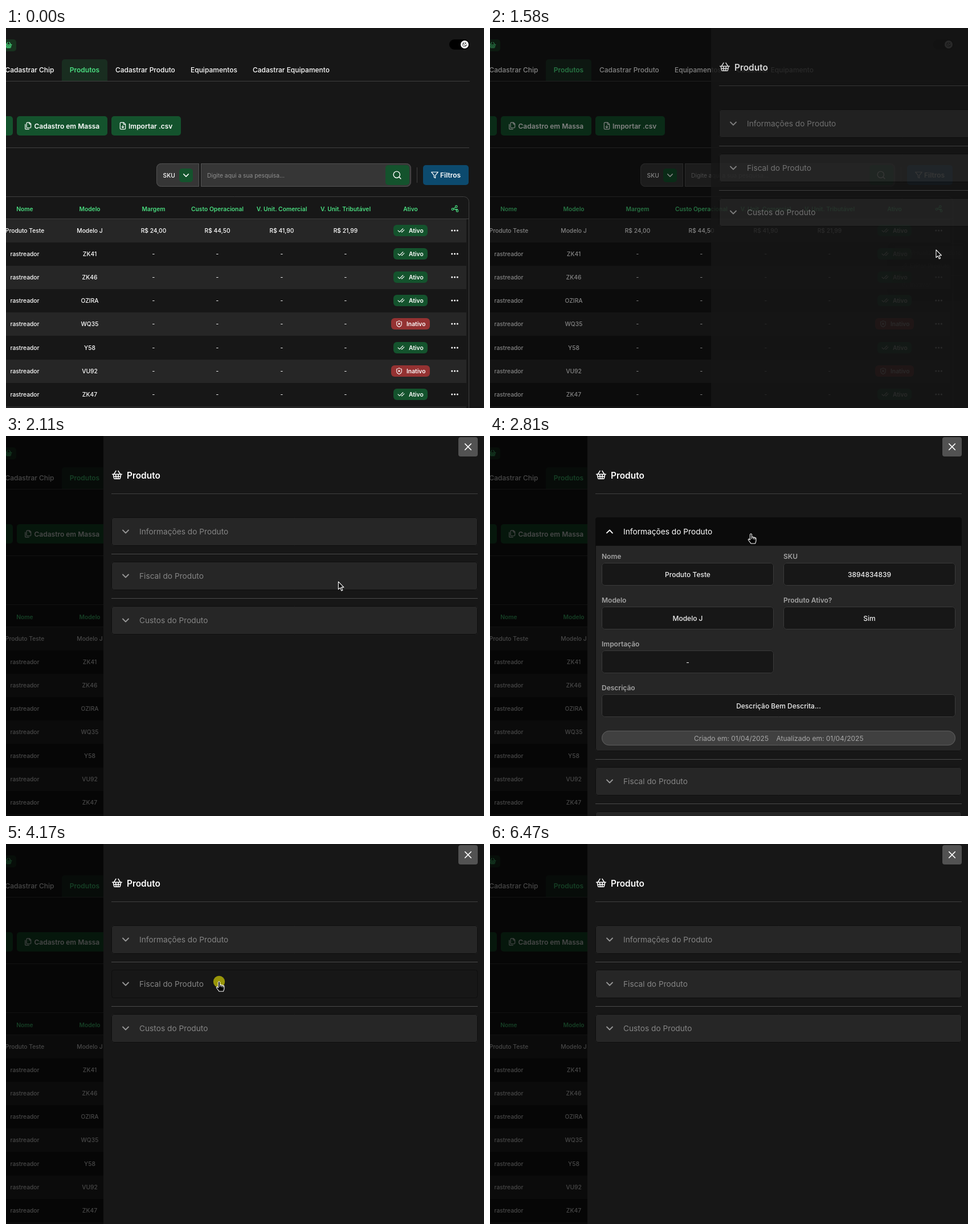
Animation of 839 by 668 pixels, one loop 6530 ms. Source, as an HTML page with a canvas:

```html
<!DOCTYPE html>
<html lang="pt-BR">
<head>
<meta charset="utf-8">
<title>Produtos</title>
<style>
html, body { margin: 0; width: 100%; height: 100%; overflow: hidden; background: #171717; }
canvas { display: block; }
</style>
</head>
<body>
<canvas id="stage" width="839" height="668"></canvas>
<script>
const W = 839, H = 668, LOOP = 6530;
const stage = document.getElementById('stage').getContext('2d');
const sheet = document.createElement('canvas');
sheet.width = W;
sheet.height = H;
const sheetCtx = sheet.getContext('2d');
let ctx = stage;

const SM = 10.29, MD = 12, LG = 13.71, XL = 15.43;
const GREEN = '#14532d', MINT = '#4ade80', BG = '#171717', ROW = '#262626', LINE = '#404040';

const ICONS = {
  chevron: 'M6 9l6 6 6-6',
  checks: 'M18 6 7 17l-5-5M22 10l-7.5 7.5L13 16',
  search: 'M19 11a8 8 0 1 1-16 0a8 8 0 1 1 16 0M21 21l-4.3-4.3',
  filter: 'M22 3H2l8 9.5V19l4 2v-8.5Z',
  close: 'M18 6 6 18M6 6l12 12',
  file: 'M15 2H6a2 2 0 0 0-2 2v16a2 2 0 0 0 2 2h12a2 2 0 0 0 2-2V7ZM14 2v4a2 2 0 0 0 2 2h4M12 18v-7M9 15l3 3 3-3',
  copies: 'M20 7h-3a2 2 0 0 1-2-2V2M9 18a2 2 0 0 1-2-2V4a2 2 0 0 1 2-2h7l4 4v10a2 2 0 0 1-2 2ZM3 7.6v12.8A1.6 1.6 0 0 0 4.6 22h9.8',
  shield: 'M20 13c0 5-3.5 7.500-8 9c-4.500-1.500-8-4-8-9V6a1 1 0 0 1 1-1c2.500 0 5-1.500 7-3c2 1.500 4.500 3 7 3a1 1 0 0 1 1 1ZM14.500 9.500l-5 5M9.500 9.500l5 5',
  basket: 'M1.500 10.500h21M3.500 11l1.700 8a2 2 0 0 0 2 1.600h9.600a2 2 0 0 0 2-1.600l1.700-8M5 10l4.500-7M19 10l-4.500-7M9 11l1 9M15 11l-1 9M4.500 15.500h15',
  nodes: 'M8 13a3 3 0 1 1-6 0a3 3 0 1 1 6 0M19 5a3 3 0 1 1-6 0a3 3 0 1 1 6 0M22 18a3 3 0 1 1-6 0a3 3 0 1 1 6 0M8 13h12M7 11l7-4M13 13l4 4',
  moon: 'M20 14a8.500 8.500 0 1 1-10-10a7 7 0 0 0 10 10ZM16 4v5M13.500 6.500h5',
  eye: 'M2 12c5-9 15-9 20 0c-5 9-15 9-20 0M15 12a3 3 0 1 1-6 0a3 3 0 1 1 6 0',
  pencil: 'M17 3l4 4L7 21l-5 1 1-5Z',
  power: 'M12 2v10M18 6.500a9 9 0 1 1-12 0'
};
for (const name in ICONS) ICONS[name] = new Path2D(ICONS[name]);
const ARROW = new Path2D('M0 0V13.500L3.200 10.600L5.400 15.800L7.500 15L5.300 9.800H9.500Z');
const HAND = new Path2D('M-1.500 1Q0-1.500 1.500 1V6Q3.500 4.500 4.500 6.500Q6 5.500 7 7Q8.500 6.500 9 8V11Q9 14 7.500 17H0Q-2 14-4.500 11Q-5 9-3.500 9L-1.500 10.500ZM1.500 6V9M4.500 6.500V9.500M7 7V10');

const clamp = v => Math.max(0, Math.min(1, v));
const span = (t, start, length) => clamp((t - start) / length);
const easeOut = u => 1 - (1 - u) ** 3;
const smooth = u => u * u * (3 - 2 * u);
const within = (t, a, b) => t >= a && t < b;

function box(x, y, w, h, r, fill, stroke) {
  ctx.beginPath();
  ctx.roundRect(x, y, w, h, r);
  ctx.fillStyle = fill;
  ctx.fill();
  if (!stroke) return;
  ctx.beginPath();
  ctx.roundRect(x + .5, y + .5, w - 1, h - 1, r);
  ctx.lineWidth = 1;
  ctx.strokeStyle = stroke;
  ctx.stroke();
}

function rect(x, y, w, h, color) {
  ctx.fillStyle = color;
  ctx.fillRect(x, y, w, h);
}

// y is the middle of the capital letters
function text(str, x, y, size, weight, color, align = 'left') {
  ctx.font = `${weight} ${size}px Inter, sans-serif`;
  ctx.textAlign = align;
  ctx.fillStyle = color;
  ctx.fillText(str, x, Math.round(y + size * .364));
}

function icon(name, cx, cy, size, color, width = 2, turn = 0) {
  ctx.save();
  ctx.translate(cx, cy);
  ctx.rotate(turn);
  ctx.scale(size / 24, size / 24);
  ctx.translate(-12, -12);
  ctx.lineWidth = width;
  ctx.lineCap = ctx.lineJoin = 'round';
  ctx.strokeStyle = color;
  ctx.stroke(ICONS[name]);
  ctx.restore();
}

function disc(x, y, r, color) {
  ctx.beginPath();
  ctx.arc(x, y, r, 0, Math.PI * 2);
  ctx.fillStyle = color;
  ctx.fill();
}

const COLUMNS = [
  ['Nome', 33], ['Modelo', 147], ['Margem', 259], ['Custo Operacional', 371],
  ['V. Unit. Comercial', 484], ['V. Unit. Tributável', 596], ['Ativo', 710]
];
const MODELS = ['Modelo J', 'ZK41', 'ZK46', 'OZIRA', 'WQ35', 'Y58', 'VU92', 'ZK47'];
const PRICES = ['R$ 24,00', 'R$ 44,50', 'R$ 41,90', 'R$ 21,99'];

function drawToolbar() {
  box(-10, 20, 28, 21, 5, '#18331f');
  icon('basket', 4.5, 30, 13, MINT);
  box(778, 20, 36, 18, 9, '#000');
  disc(805, 29, 7, '#fff');
  icon('moon', 805, 29, 10, '#171717');

  box(98, 55, 80, 38, [5, 5, 0, 0], '#192d20');
  rect(0, 93, 814, 1, LINE);
  text('Cadastrar Chip', 84.5, 74, MD, 500, '#fff', 'right');
  text('Produtos', 138, 74, MD, 600, MINT, 'center');
  text('Cadastrar Produto', 192, 74, MD, 500, '#fff');
  text('Equipamentos', 324, 74, MD, 500, '#fff');
  text('Cadastrar Equipamento', 433, 74, MD, 500, '#fff');

  box(-20, 155, 32, 34, 5, GREEN);
  box(19, 155, 159, 34, 5, GREEN);
  icon('copies', 39, 172, 14, '#fff');
  text('Cadastro em Massa', 49.5, 172.5, MD, 600, '#fff');
  box(185, 155, 122, 34, 5, GREEN);
  icon('file', 205, 172, 14, '#fff');
  text('Importar .csv', 215, 172.5, MD, 600, '#fff');
  rect(0, 210, 813, 1, LINE);

  box(264, 238, 75, 41, [8, 0, 0, 8], '#363636', '#525252');
  text('SKU', 275.5, 259, SM, 500, '#fff');
  box(304, 247, 24, 24, 5, GREEN);
  icon('chevron', 316, 259, 17, '#fff');
  box(342, 238, 369, 41, [0, 8, 8, 0], '#363636', '#525252');
  text('Digite aqui a sua pesquisa...', 353, 259, SM, 400, '#8f8f8f');
  box(666, 241, 42, 35, 5, GREEN);
  icon('search', 686.5, 258.5, 17, '#fff');
  rect(721, 245, 1, 27, LINE);
  box(732, 241, 80, 35, 5, '#0c4a6e');
  icon('filter', 752.5, 258.5, 14, '#fff');
  text('Filtros', 762, 259, MD, 600, '#fff');
}

function drawBadge(y, active) {
  if (active) box(680, y - 10, 60, 20, 6, GREEN);
  else box(676, y - 10, 68, 20, 6, '#943232');
  icon(active ? 'checks' : 'shield', active ? 693.5 : 690, y, 13, '#fff');
  text(active ? 'Ativo' : 'Inativo', active ? 707 : 703, y, SM, 600, '#fff');
}

function drawTable(hoverFirst) {
  box(-20, 296, 833, 400, 9, BG, LINE);
  for (const [label, x] of COLUMNS) text(label, x, 318.5, SM, 600, MINT, 'center');
  icon('nodes', 788, 318, 14, MINT);
  rect(0, 335, 812, 1, LINE);
  for (let i = 0; i < 9; i += 2) rect(0, Math.round(336 + i * 41.1), 808, 41, ROW);
  MODELS.forEach((model, i) => {
    const y = Math.round(356 + i * 41.1);
    const cells = [i ? 'rastreador' : 'Produto Teste', model, ...PRICES.map(p => i ? '-' : p)];
    cells.forEach((cell, c) => text(cell, COLUMNS[c][1], y, SM, 500, '#fff', 'center'));
    drawBadge(y, i !== 4 && i !== 6);
    if (!i && hoverFirst) box(776, 344, 24, 24, 5, LINE);
    for (const x of [782.8, 787.6, 792.4]) disc(x, y, 1.5, '#fff');
  });
}

function drawMenu(alpha, hovered) {
  if (alpha <= 0) return;
  ctx.save();
  ctx.globalAlpha = alpha;
  ctx.shadowColor = 'rgba(0,0,0,.5)';
  ctx.shadowBlur = 14;
  ctx.shadowOffsetY = 4;
  box(707, 378, 127, 88, 5, '#1c1c1c');
  ctx.shadowColor = 'transparent';
  box(707, 378, 127, 88, 5, '#1c1c1c', LINE);
  if (hovered) box(711, 383, 119, 23, 3, LINE);
  rect(711, 435, 119, 1, LINE);
  const items = [['eye', 'Visualizar Produto', 395], ['pencil', 'Editar Produto', 418], ['power', 'Inativar', 451]];
  for (const [glyph, label, y] of items) {
    icon(glyph, 728, y, 11, '#e5e5e5');
    text(label, 737, y, SM, 500, '#e5e5e5');
  }
  ctx.restore();
}

function field(label, value, x, y, w = 302) {
  text(label, x, y, MD, 600, '#a3a3a3');
  box(x, y + 11, w, 40, 5, BG, '#3a3a3a');
  text(value, x + w / 2, y + 32, MD, 500, '#f0f0f0', 'center');
}

function drawInfo(y) {
  field('Nome', 'Produto Teste', 196, y + 20);
  field('SKU', '3894834839', 515, y + 20);
  field('Modelo', 'Modelo J', 196, y + 97);
  field('Produto Ativo?', 'Sim', 515, y + 97);
  field('Importação', '-', 196, y + 174);
  field('Descrição', 'Descrição Bem Descrita...', 196, y + 251, 621);
  box(196, y + 326, 621, 26, 13, LINE, '#5c5c5c');
  text('Criado em: 01/04/2025', 423.5, y + 339.5, MD, 400, '#a8a8a8', 'center');
  text('Atualizado em: 01/04/2025', 579, y + 339.5, MD, 400, '#a8a8a8', 'center');
}

function drawFiscal(y) {
  ['NCM', 'CEST', 'CFOP', 'Origem', 'CST', 'EAN', 'IPI', 'ICMS', 'PIS', 'COFINS'].forEach((label, i) =>
    field(label, '-', i % 2 ? 515 : 196, y + 20 + 77 * (i >> 1)));
}

// Returns the y at which the section ends.
function drawSection(title, y, s) {
  const extra = Math.round(s.open * s.height);
  const header = s.open ? '#0b0b0b' : s.hover ? BG : ROW;
  if (extra) {
    box(185, y, 643, 50 + extra, 4, ROW, '#0e0e0e');
    ctx.save();
    ctx.beginPath();
    ctx.rect(185, y + 50, 643, extra);
    ctx.clip();
    s.body(y + 49);
    ctx.restore();
  }
  box(185, y, 643, 50, extra ? [4, 4, 0, 0] : 4, header, extra ? header : '#0e0e0e');
  const tone = Math.round(150 + 105 * s.turn);
  icon('chevron', 210, y + 25, 20, `rgb(${tone},${tone},${tone})`, 2.2, -Math.PI * s.turn);
  text(title, 234, y + 25.5, LG, 400, s.open ? '#fff' : '#858585');
  return y + 50 + extra;
}

function drawSheet(t) {
  const opening = start => easeOut(span(t, start, 140));
  const turning = (start, end) => smooth(span(t, start, 190)) * (1 - smooth(span(t, end, 280)));
  const sections = [
    ['Informações do Produto', {
      open: t < 3710 ? opening(2630) : 0, turn: turning(2630, 3710),
      hover: within(t, 2390, 3880), height: 361, body: drawInfo
    }],
    ['Fiscal do Produto', {
      open: t < 5320 ? opening(4290) : 0, turn: turning(4270, 5330),
      hover: within(t, 4050, 5490), height: 470, body: drawFiscal
    }],
    ['Custos do Produto', { open: 0, turn: 0, hover: within(t, 5490, 5600), height: 0 }]
  ];
  ctx = sheetCtx;
  rect(0, 0, W, H, BG);
  box(794, 2, 34, 34, 4, '#525252');
  icon('close', 811, 19, 21, '#fff');
  icon('basket', 195, 68.5, 19, '#fff');
  text('Produto', 212, 69.5, XL, 600, '#fff');
  rect(185, 101, 643, 1, LINE);
  let y = 143;
  sections.forEach(([title, state], i) => {
    y = drawSection(title, y, state);
    if (i < 2) rect(185, y + 14, 643, 1, '#4a4a4a');
    y += 28;
  });
  ctx = stage;
}

const PATH = [
  [0, 792, 690], [60, 792, 672], [650, 785, 355], [850, 785, 356], [930, 784, 381], [1060, 783, 390],
  [1690, 783, 390], [2420, 458, 172], [3770, 458, 172], [4110, 374, 242], [5380, 374, 242],
  [5950, 790, 672], [LOOP, 790, 672]
];
const PRESSES = [[780, 910], [1390, 1500], [2490, 2620], [3640, 3710], [4170, 4295], [4960, 5320]];
const HANDS = [[570, 870], [2390, 3880], [4050, 5490]];

function cursorAt(t) {
  if (within(t, 6330, 6470)) return [788, 666];
  const i = PATH.findIndex((p, n) => n && t <= p[0]);
  const [t0, x0, y0] = PATH[i - 1], [t1, x1, y1] = PATH[i];
  const u = smooth((t - t0) / (t1 - t0));
  return [x0 + (x1 - x0) * u, y0 + (y1 - y0) * u];
}

function drawCursor(t) {
  const [x, y] = cursorAt(t);
  const active = ranges => ranges.some(([a, b]) => within(t, a, b));
  if (active(PRESSES)) disc(x, y, 10.2, 'rgba(255,250,0,.56)');
  const shape = active(HANDS) ? HAND : ARROW;
  ctx.save();
  ctx.translate(x, y);
  ctx.fillStyle = '#000';
  ctx.fill(shape);
  ctx.lineWidth = 1.1;
  ctx.lineJoin = 'round';
  ctx.strokeStyle = '#fff';
  ctx.stroke(shape);
  ctx.restore();
}

function draw(t) {
  rect(0, 0, W, H, BG);
  drawToolbar();
  drawTable(within(t, 570, 1500));
  drawMenu(span(t, 960, 150) * (1 - span(t, 1450, 150)), within(t, 1060, 1600));

  const slide = easeOut(span(t, 1456, 400));
  if (slide > 0) {
    rect(0, 0, W, H, `rgba(0,0,0,${.72 * slide})`);
    drawSheet(t);
    ctx.globalAlpha = Math.sqrt(slide);
    ctx.drawImage(sheet, 171, 0, 668, H, 171 + Math.round(668 * (1 - slide)), 0, 668, H);
    ctx.globalAlpha = 1;
  }
  drawCursor(t);
}

const start = performance.now();
function tick() {
  draw((performance.now() - start) % LOOP);
  requestAnimationFrame(tick);
}
tick();
</script>
</body>
</html>
```
